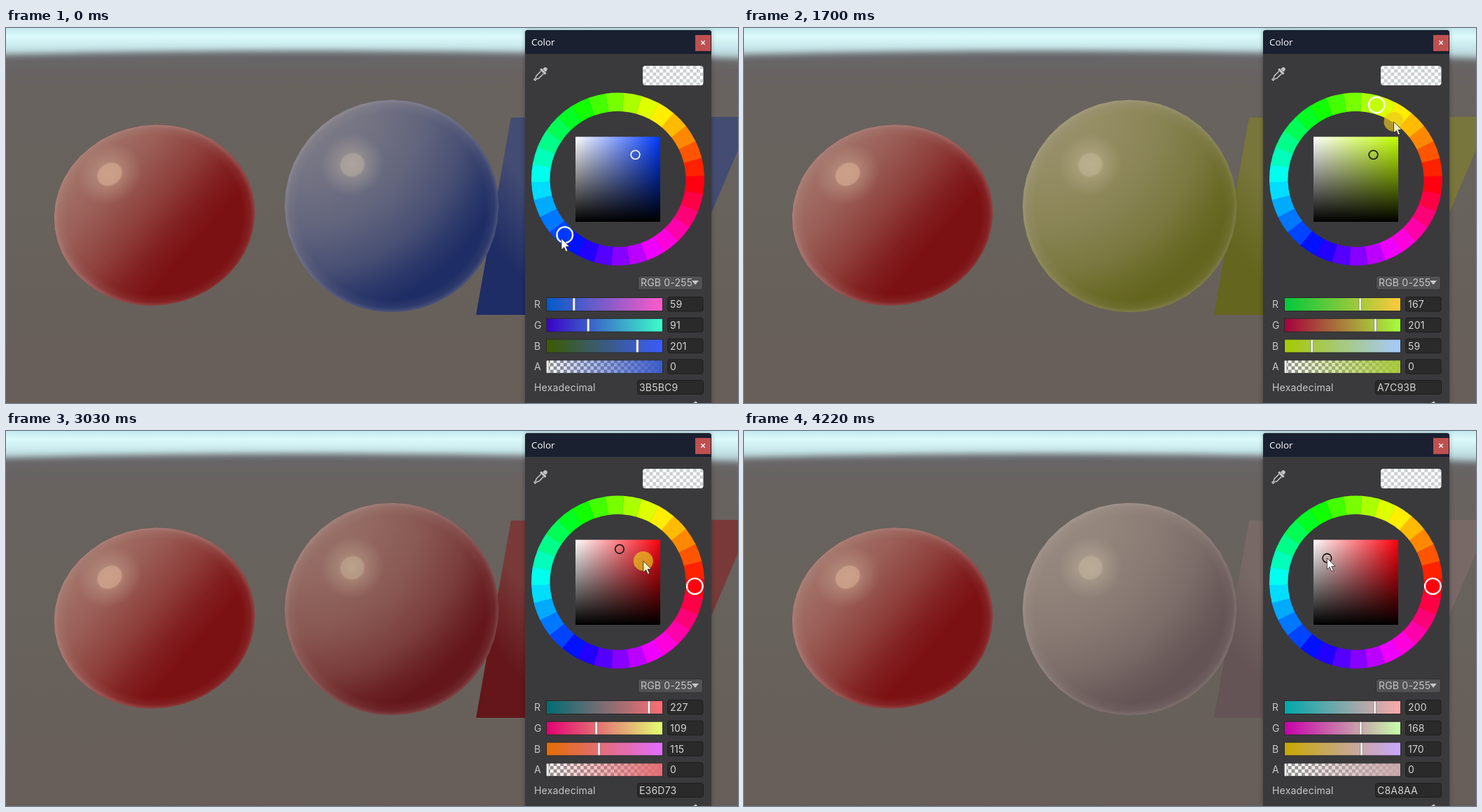
An HTML page for the animation above (5.08 s loop, 1045 by 536 pixels).

```html
<!DOCTYPE html>
<html lang="en">
<head>
<meta charset="utf-8">
<title>Color picker</title>
<style>
html, body { margin: 0; width: 100%; height: 100%; overflow: hidden; background: #67605b; }
svg { display: block; width: 1045px; height: 536px; }
text { font: 14px Inter, sans-serif; letter-spacing: .2px; fill: #c6c6c6; }
.value { fill: #d4d4d4; }
.title { font: 13.4px "Open Sans", sans-serif; letter-spacing: 0; fill: #fff; }
.box { fill: #2a2a2b; stroke: #1e1e1f; }
</style>
</head>
<body>
<svg id="stage" viewBox="0 0 1045 536" xmlns="http://www.w3.org/2000/svg">
  <defs>
    <linearGradient id="sky" x2="0" y2="1">
      <stop stop-color="#c3e9ec"/><stop offset=".2" stop-color="#dcfafb"/>
      <stop offset=".45" stop-color="#c8e8eb"/><stop offset="1" stop-color="#9eb2b8"/>
    </linearGradient>
    <linearGradient id="ground" gradientUnits="userSpaceOnUse" x1="0" y1="30" x2="0" y2="536">
      <stop stop-color="#66666a"/><stop offset=".1" stop-color="#68635f"/>
      <stop offset=".5" stop-color="#67625b"/><stop offset="1" stop-color="#685e59"/>
    </linearGradient>
    <linearGradient id="redLight" gradientUnits="userSpaceOnUse" x1="105" y1="190" x2="290" y2="350">
      <stop stop-color="#b9ac9b" stop-opacity=".64"/><stop offset=".25" stop-color="#b9ac9b" stop-opacity=".5"/>
      <stop offset=".5" stop-color="#b9ac9b" stop-opacity=".29"/><stop offset=".68" stop-color="#b9ac9b" stop-opacity=".09"/>
      <stop offset=".82" stop-color="#b9ac9b" stop-opacity="0"/>
    </linearGradient>
    <radialGradient id="ballLight" gradientUnits="userSpaceOnUse" cx="420" cy="110" r="320">
      <stop stop-color="#b9ac9b" stop-opacity=".64"/><stop offset=".3" stop-color="#b9ac9b" stop-opacity=".56"/>
      <stop offset=".55" stop-color="#b9ac9b" stop-opacity=".44"/><stop offset=".75" stop-color="#b9ac9b" stop-opacity=".27"/>
      <stop offset=".88" stop-color="#b9ac9b" stop-opacity=".09"/><stop offset=".97" stop-color="#b9ac9b" stop-opacity="0"/>
    </radialGradient>
    <radialGradient id="rim">
      <stop offset=".88" stop-color="#c0b4b0" stop-opacity="0"/><stop offset=".96" stop-color="#c0b4b0" stop-opacity=".1"/>
      <stop offset="1" stop-color="#c0b4b0" stop-opacity=".3"/>
    </radialGradient>
    <radialGradient id="glow">
      <stop stop-color="#dfcfb2" stop-opacity=".48"/><stop offset=".35" stop-color="#dfcfb2" stop-opacity=".4"/>
      <stop offset=".42" stop-color="#dfcfb2" stop-opacity=".25"/><stop offset="1" stop-color="#dfcfb2" stop-opacity="0"/>
    </radialGradient>
    <linearGradient id="planeLight" gradientUnits="userSpaceOnUse" x1="695" y1="310" x2="765" y2="250">
      <stop stop-color="#b9ac9b" stop-opacity="0"/><stop offset="1" stop-color="#b9ac9b" stop-opacity=".24"/>
    </linearGradient>
    <linearGradient id="sat"><stop stop-color="#fff"/><stop id="hueStop" offset="1"/></linearGradient>
    <linearGradient id="shade" x2="0" y2="1"><stop stop-opacity="0"/><stop offset="1"/></linearGradient>
    <pattern id="check" width="9.6" height="9.6" patternUnits="userSpaceOnUse" x="772" y="475">
      <path fill="#fff" d="M0 0h9.6v9.6H0z"/><path id="checkCells" fill="#8f8f8f" d="M0 4.8h4.8V0h4.8v4.8H4.8v4.8H0z"/>
    </pattern>
    <pattern id="paleCheck" width="9.6" height="9.6" patternUnits="userSpaceOnUse" x="909" y="54">
      <path fill="#fff" d="M0 0h9.6v9.6H0z"/><path fill="#cccfd1" d="M0 4.8h4.8V0h4.8v4.8H4.8v4.8H0z"/>
    </pattern>
    <filter id="soft" x="-5%" y="-5%" width="110%" height="110%"><feGaussianBlur stdDeviation="5"/></filter>
    <filter id="shadow" x="-10%" y="-5%" width="120%" height="110%"><feGaussianBlur stdDeviation="3"/></filter>
  </defs>

  <rect width="1045" height="60" fill="url(#sky)"/>
  <path d="M-60 40Q520 23 1105 46V600H-60z" fill="url(#ground)" filter="url(#soft)"/>
  <rect y="80" width="1045" height="456" fill="url(#ground)"/>

  <g id="plane">
    <path class="tint" d="M721 128L1065 127 945 410 671 410z"/>
    <path fill="url(#planeLight)" d="M721 128L1065 127 945 410 671 410z"/>
  </g>
  <g id="balls"></g>

  <path d="M741 7q0-4 4-4h258q4 0 4 4v540H741z" opacity=".3" filter="url(#shadow)"/>
  <path d="M741 7q0-4 4-4h258q4 0 4 4v529H741z" fill="#3a3a3c"/>
  <path d="M741 37V7q0-4 4-4h258q4 0 4 4v30z" fill="#1a2030"/>
  <text class="title" x="750" y="25">Color</text>
  <rect x="984" y="10" width="22" height="23" fill="#bf5050"/>
  <path d="M992.3 18.3l5.4 5.4m0-5.4l-5.4 5.4" stroke="#fff" stroke-width="1.3"/>

  <g transform="translate(763 66) rotate(45)" fill="#c4c4c4">
    <path d="M-2.8-7.5v-2.3a2.8 2.8 0 0 1 5.6 0v2.3z"/>
    <rect x="-5.2" y="-7" width="10.4" height="3.2" rx="1"/>
    <path d="M-2.6-3.5V6L-1 8.5v3.2h2V8.5L2.6 6V-3.5" fill="none" stroke="#c4c4c4" stroke-width="1.5"/>
  </g>
  <rect x="909" y="54" width="86.5" height="28" rx="4" fill="url(#paleCheck)"/>

  <g id="wheel"></g>
  <g id="square">
    <rect x="813" y="155.5" width="121" height="121.5" fill="url(#sat)"/>
    <rect x="813" y="155.5" width="121" height="121.5" fill="url(#shade)"/>
  </g>
  <circle id="hueMark" r="11.3" stroke="#fff" stroke-width="2.3"/>
  <circle id="svMark" r="6.3" fill="none" stroke-width="1.6"/>

  <rect x="902.5" y="354.5" width="92" height="19.5" rx="3" fill="#515153" stroke="#303031"/>
  <text x="906" y="369">RGB 0-255</text>
  <path d="M979 361h10l-5 6z" fill="#c6c6c6"/>

  <g id="rows"></g>
  <text x="754" y="519">Hexadecimal</text>
  <rect class="box" x="901.5" y="503.5" width="94" height="20" rx="3"/>
  <text id="hex" class="value" x="904" y="519"></text>
  <path d="M981 536l4-2.5 2 2.5z" fill="#d0d0d0"/>

  <circle id="halo" r="14" fill="#ebc81e" fill-opacity=".68"/>
  <path id="arrow" d="M0 0V16.2L3.8 12.7 6.4 18.8 9 17.7 6.4 11.7H11.6z" stroke="#222" stroke-width=".8"/>
</svg>
<script>
const NS = "http://www.w3.org/2000/svg";
const $ = id => document.getElementById(id);
const add = (parent, tag, attrs, text) => {
  const el = document.createElementNS(NS, tag);
  for (const k in attrs) el.setAttribute(k, attrs[k]);
  if (text) el.textContent = text;
  parent.appendChild(el);
  return el;
};
const css = c => `rgb(${c.map(Math.round)})`;
const clamp = (v, a, b) => Math.min(b, Math.max(a, v));

const LOOP = 5080, LAG = 100, CX = 873.5, CY = 216;
const RELEASE = 2250, PRESS = 2450, DONE = 4120;
const START_SV = [142 / 201, 201 / 255];

// Pointer on the ring: time, hue, radius
const ring = [
  [130, 226.48, 117], [690, 171.55, 109], [790, 160, 107], [1250, 119.16, 100],
  [1350, 111, 96], [1880, 25.35, 100], [1980, 9, 101], [2130, -3.05, 108], [2250, -3.05, 110]
];
// Pointer in the square: time, saturation, value
const scrub = [
  [2250, 1.408, .453], [2450, .76, .66], [2600, .76, .51], [2720, .44, .53],
  [2820, .3, .72], [2930, 118 / 227, 227 / 255], [3030, .8, .75], [3130, .76, .51],
  [3250, .43, .43], [3390, .17, .68], [3490, 62 / 230, 230 / 255], [3590, .38, .667],
  [3690, .42, .54], [3800, .24, .47], [3920, .11, .62], [4060, .16, 200 / 255]
];

// Smooth curve through the keys without overshoot
function sample(keys, t, k) {
  const n = keys.length - 1;
  if (t <= keys[0][0]) return keys[0][k];
  if (t >= keys[n][0]) return keys[n][k];
  let i = 0;
  while (keys[i + 1][0] <= t) i++;
  const rate = j => (keys[j + 1][k] - keys[j][k]) / (keys[j + 1][0] - keys[j][0]);
  const slope = j => {
    if (j === 0 || j === n) return 0;
    const a = rate(j - 1), b = rate(j);
    return a * b <= 0 ? 0 : 2 * a * b / (a + b);
  };
  const h = keys[i + 1][0] - keys[i][0], u = (t - keys[i][0]) / h, w = 1 - u;
  return w * w * ((1 + 2 * u) * keys[i][k] + u * h * slope(i))
    + u * u * ((1 + 2 * w) * keys[i + 1][k] - w * h * slope(i + 1));
}

function rgb(h, s, v) {
  const f = n => {
    const k = (((n + h / 60) % 6) + 6) % 6;
    return 255 * v * (1 - s * clamp(Math.min(k, 4 - k), 0, 1));
  };
  return [f(5), f(3), f(1)];
}

function pick(t) {
  const sv = t < PRESS ? START_SV : [sample(scrub, t, 1), sample(scrub, t, 2)];
  return [sample(ring, t, 1), ...sv.map(x => clamp(x, 0, 1))];
}

const polar = (deg, r) => {
  const a = deg * Math.PI / 180;
  return [CX + r * Math.cos(a), CY - r * Math.sin(a)];
};
const inSquare = (s, v) => [813 + 121 * s, 277 - 121.5 * v];
const pointer = t => t < RELEASE
  ? polar(sample(ring, t, 1), sample(ring, t, 2))
  : inSquare(sample(scrub, t, 1), sample(scrub, t, 2));

function ball(cx, cy, rx, ry, tilt, light, fill, spot) {
  const g = add($("balls"), "g", {});
  const pts = [], N = 44, c = Math.cos(tilt), s = Math.sin(tilt);
  for (let i = 0; i < N; i++) {
    const a = i / N * 2 * Math.PI, x = rx * Math.cos(a), y = ry * Math.sin(a);
    pts.push([(cx + x * c - y * s).toFixed(1), (cy + x * s + y * c).toFixed(1)]);
  }
  const points = pts.join(" ");
  add(g, "polygon", fill ? { points, fill } : { points, class: "tint" });
  add(g, "polygon", { points, fill: `url(#${light})` });
  add(g, "polygon", { points, fill: "url(#rim)" });
  const [x, y, w, h, turn] = spot;
  const transform = `translate(${x} ${y}) rotate(${turn})`;
  add(g, "ellipse", { rx: w, ry: h, transform, fill: "url(#glow)" });
  return { g, transform };
}

const red = ball(212, 267.5, 143.6, 129, -.14, "redLight", "#7c1113", [148, 209, 48, 42, -35]);
add(red.g, "ellipse", { rx: 18.5, ry: 15, transform: red.transform, fill: "#dcaa8e", "fill-opacity": .5 });
const big = ball(550.5, 254.5, 152.8, 151.8, 0, "ballLight", null, [494.5, 195.5, 46, 44, -35]);
add(big.g, "ellipse", { rx: 17, ry: 16, transform: big.transform, fill: "#dfcfb2", "fill-opacity": .12 });

for (let i = 0; i < 30; i++) {
  const a = 2 + i * 12, b = a + 12.15;
  add($("wheel"), "path", {
    fill: css(rgb(a + 6, 1, 1)),
    d: `M${polar(a, 123.5)}A123.5 123.5 0 0 0 ${polar(b, 123.5)}L${polar(b, 97)}A97 97 0 0 1 ${polar(a, 97)}z`
  });
}

const rows = [..."RGBA"].map((name, i) => {
  const g = add($("rows"), "g", { transform: `translate(0 ${385 + 29.75 * i})` });
  const grad = add(g, "linearGradient", { id: "slide" + name });
  const stops = [0, 1].map(offset => add(grad, "stop", { offset }));
  const bar = { x: 771.5, y: .5, width: 166, height: 19 };
  add(g, "text", { x: 754, y: 15 }, name);
  if (i === 3) {
    add(g, "rect", { ...bar, fill: "url(#check)" });
    stops[0].setAttribute("stop-opacity", 0);
  }
  add(g, "rect", { ...bar, fill: `url(#slide${name})`, stroke: "#29292a" });
  const knob = add(g, "rect", { y: 1, width: 3.6, height: 18, rx: 1, fill: "#f0f0f0", stroke: "#555", "stroke-width": .5 });
  add(g, "rect", { class: "box", x: 944.5, y: -.5, width: 50.5, height: 20.5, rx: 3 });
  const value = add(g, "text", { class: "value", x: 948, y: 15 }, "0");
  return { stops, knob, value };
});

const tinted = document.querySelectorAll(".tint");
const place = (el, [x, y]) => el.setAttribute("transform", `translate(${x.toFixed(2)} ${y.toFixed(2)})`);

function render(t) {
  const [h, s, v] = pick(t - LAG);
  const color = rgb(h, s, v).map(Math.round);

  const dark = css(rgb(...pick(t - 20)).map(c => c * .5));
  tinted.forEach(el => el.setAttribute("fill", dark));

  const pure = css(rgb(h, 1, 1));
  $("hueStop").setAttribute("stop-color", pure);
  $("hueMark").setAttribute("fill", pure);
  place($("hueMark"), polar(h, 110));
  place($("svMark"), inSquare(s, v));
  const luma = .3 * color[0] + .59 * color[1] + .11 * color[2];
  $("svMark").setAttribute("stroke", luma < 112 ? "#fff" : "#111");

  rows.forEach((row, i) => {
    const level = i < 3 ? color[i] : 0;
    row.stops.forEach((stop, end) => {
      const c = color.slice();
      if (i < 3) c[i] = end * 255;
      stop.setAttribute("stop-color", css(c));
    });
    row.knob.setAttribute("x", 771.4 + level * .6375);
    row.value.textContent = level;
  });
  $("hex").textContent = color.map(c => c.toString(16).padStart(2, "0")).join("").toUpperCase();

  const down = t >= 130 && t < RELEASE || t >= PRESS && t < DONE;
  const tip = pointer(t);
  $("halo").setAttribute("visibility", down ? "visible" : "hidden");
  $("arrow").setAttribute("fill", down ? "#f5edbd" : "#fff");
  place($("halo"), tip);
  place($("arrow"), tip);
}

// The picture advances in 70 ms steps after two longer holds
function step(t) {
  if (t < 130) return 0;
  if (t < 230) return 130;
  return Math.min(4220, 230 + 70 * Math.floor((t - 230) / 70));
}

function tick() {
  render(step(performance.now() % LOOP));
  requestAnimationFrame(tick);
}
tick();
</script>
</body>
</html>
```
